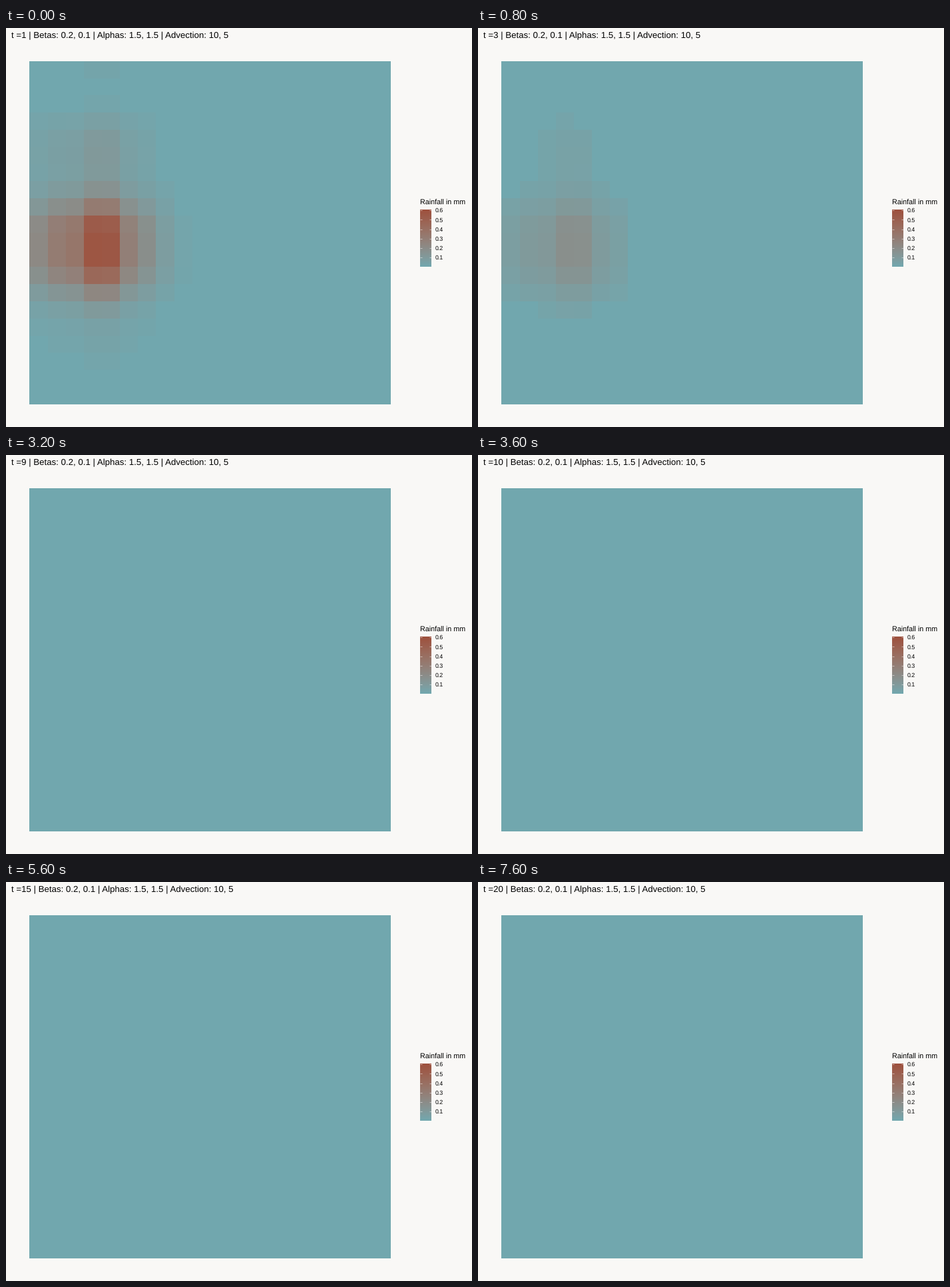
A matplotlib script for the animation above (8 s loop, 700 by 600 pixels).

```python
import numpy as np
import matplotlib.pyplot as plt
from matplotlib.animation import FuncAnimation

WIDTH, HEIGHT, DPI = 700, 600, 100
PX = 72 / DPI  # points per pixel
CELLS, STEPS, STEP_MS = 20, 20, 400
PEAK, DECAY, MAX_RAIN = 0.6, 0.55, 0.608
LOW, HIGH = "#71a7ae", "#9d503d"

plt.rcParams["font.family"] = "Liberation Sans"
plt.rcParams["text.hinting"] = "none"


def lobe(center, width, height=1, power=2):
    distance = np.abs(np.arange(CELLS) - center)
    return height * np.exp(-(distance / width) ** power)


# The storm: a broad band with a narrow core across, a saturated main lobe
# with weaker side lobes down.
COLUMNS = lobe(2.85, 3.55, 0.6, power=3) + lobe(3.5, 0.65, 0.4, power=8)
ROWS = np.minimum(1, lobe(10.3, 2.6, 1.2) + lobe(4.5, 1.9, 0.17)
                  + lobe(16, 1.6, 0.04) + lobe(0, 0.5, 0.033))

TO_XYZ = np.array([[0.4124, 0.3576, 0.1805],
                   [0.2126, 0.7152, 0.0722],
                   [0.0193, 0.1192, 0.9505]])
WHITE = TO_XYZ.sum(axis=1)
TO_LAB = np.array([[0, 116, 0], [500, -500, 0], [0, 200, -200]])


def hex_to_lab(color):
    rgb = np.array([int(color[i:i + 2], 16) for i in (1, 3, 5)]) / 255
    linear = np.where(rgb > 0.04045, ((rgb + 0.055) / 1.055) ** 2.4, rgb / 12.92)
    return TO_LAB @ np.cbrt(TO_XYZ @ linear / WHITE)


def lab_to_rgb(lab):
    xyz = (lab @ np.linalg.inv(TO_LAB).T) ** 3 * WHITE
    linear = np.clip(xyz @ np.linalg.inv(TO_XYZ).T, 0, 1)
    rgb = np.where(linear > 0.0031308,
                   1.055 * linear ** (1 / 2.4) - 0.055, 12.92 * linear)
    return np.clip(rgb, 0, 1)


def rain_color(rain):
    share = np.clip(np.asarray(rain) / MAX_RAIN, 0, 1)[..., None]
    low, high = hex_to_lab(LOW), hex_to_lab(HIGH)
    return lab_to_rgb(low + share * (high - low))


def rainfall(step):
    # The rows flatten as the rain fades; the faintest cells count as dry.
    flattening = max(0.85, 1 - 0.1 * step)
    rain = PEAK * DECAY ** step * np.outer(ROWS ** flattening, COLUMNS)
    return np.where(rain < 0.013 + 0.0047 * step, 0, rain)


def title_text(step):
    return (f"t ={step + 1} | Betas: 0.2, 0.1 | Alphas: 1.5, 1.5"
            " | Advection: 10, 5")


fig = plt.figure(figsize=(WIDTH / DPI, HEIGHT / DPI), dpi=DPI,
                 facecolor="#f9f8f6")
ax = fig.add_axes([0, 0, 1, 1])
ax.axis("off")

# Cell edges sit on whole pixels.
edges = np.arange(CELLS + 1)
x_edges = np.round(35.4 + 27.15 * edges)
y_edges = np.round(49.8 + 25.8 * edges)
field = ax.pcolormesh(x_edges, y_edges, rain_color(rainfall(0)))
title = ax.text(8, 15, title_text(0), fontsize=13.2 * PX, va="baseline")

# Colour bar
BAR_LEFT, BAR_RIGHT, BAR_TOP, BAR_BOTTOM = 622, 639, 273, 359
ramp = rain_color(np.linspace(MAX_RAIN, 0, BAR_BOTTOM - BAR_TOP))[:, None, :]
ax.pcolormesh([BAR_LEFT, BAR_RIGHT], np.arange(BAR_TOP, BAR_BOTTOM + 1), ramp)
ax.text(BAR_LEFT, 266, "Rainfall in mm", fontsize=10.75 * PX, va="baseline")
for tenth in range(1, 7):
    y = 359.4 - 14.2 * tenth
    for x in (BAR_LEFT, BAR_RIGHT - 3.4):
        ax.plot([x, x + 3.4], [y, y], color="white", lw=0.5 * PX,
                solid_capstyle="butt")
    ax.text(644.6, y + 3.2, f"{tenth / 10:.1f}", fontsize=8.8 * PX,
            va="baseline")

ax.set_xlim(0, WIDTH)
ax.set_ylim(HEIGHT, 0)


def update(step):
    field.set_array(rain_color(rainfall(step)))
    title.set_text(title_text(step))
    return field, title


anim = FuncAnimation(fig, update, frames=STEPS, interval=STEP_MS,
                     repeat=True, repeat_delay=0)
plt.show()
```
